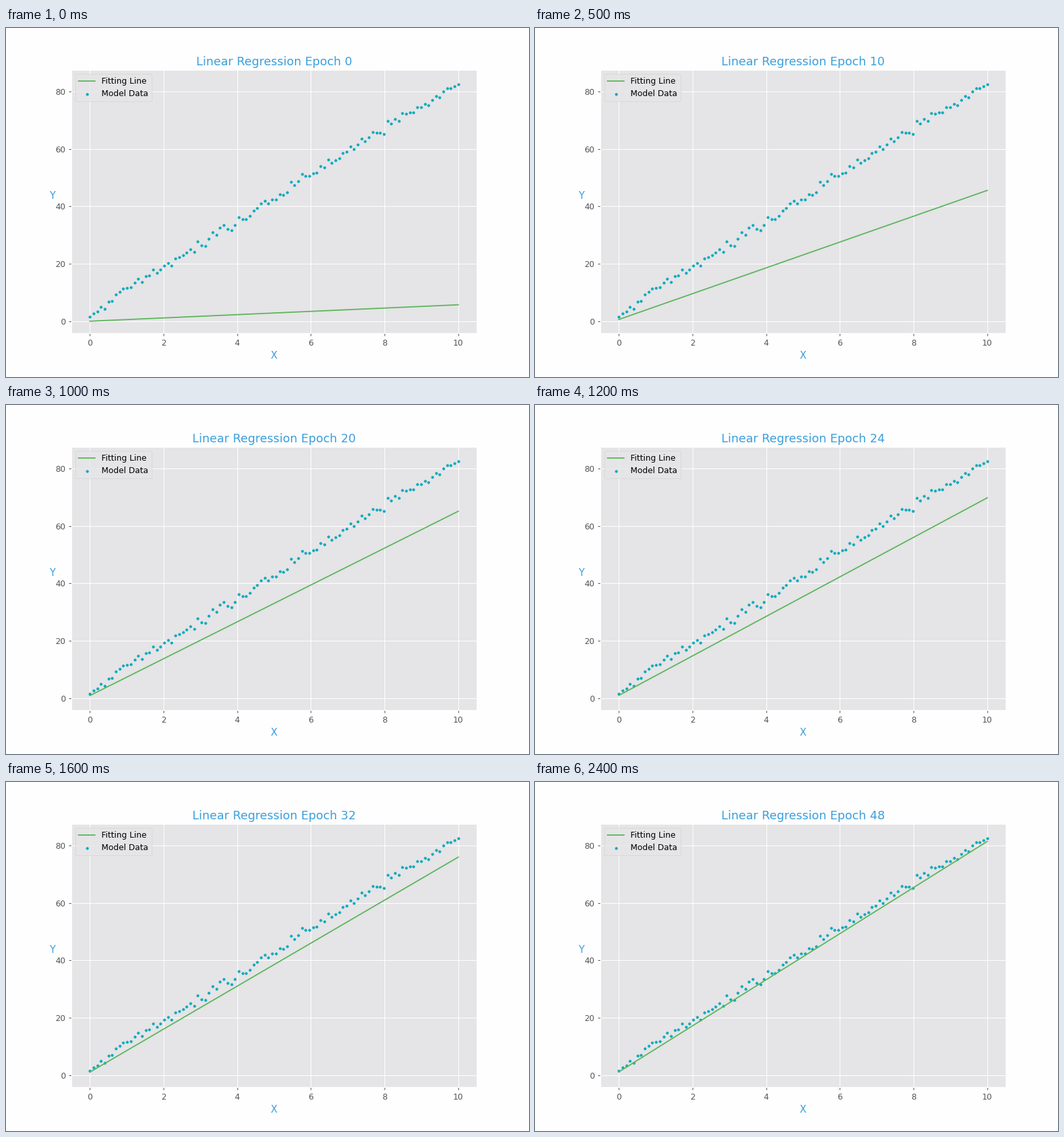
A matplotlib script for the animation above (2500 ms loop, 800 by 533 pixels).

```python
import numpy as np
import matplotlib.pyplot as plt
from matplotlib.animation import FuncAnimation

W, H, DPI = 800, 533, 72  # at 72 dpi one point is one pixel
FRAMES, INTERVAL, EPOCHS_PER_FRAME = 25, 100, 2
BLUE, TEAL, GREEN = "#3a9fdd", "#03a9bd", "#5cb65d"
PAPER, PANEL, GREY = "#fefefe", "#e5e4e6", "#555555"

plt.rcParams.update({"font.family": "DejaVu Sans", "font.size": 12.5})

# Noisy samples of y = 8x + 3
rng = np.random.default_rng(8)
x = np.linspace(0, 10, 100)
y = 8 * x + 3 + np.clip(rng.normal(0, 0.85, x.size), -2.2, 2.2)


def fit(epoch):
    """Line heights at x = 0 and x = 10, closing in geometrically."""
    gap = np.exp(-0.0711 * epoch)
    return [1.26 - 1.17 * gap, 83.93 - 78.13 * gap]


def axis_label(px, py, text):
    fig.text(px / W, 1 - py / H, text, color=BLUE, size=15,
             ha="center", va="baseline")


fig = plt.figure(figsize=(W / DPI, H / DPI), dpi=DPI, facecolor=PAPER)
ax = fig.add_axes([0.125, 0.125, 0.775, 0.755], facecolor=PANEL)
ax.set(xlim=(-0.5, 10.5), ylim=(-4.14, 87.45),
       xticks=range(0, 11, 2), yticks=range(0, 81, 20))
ax.set_axisbelow(True)
ax.grid(color="white", lw=1)
ax.tick_params(color=GREY, labelcolor=GREY, length=4.4, width=1, pad=4.4)
for spine in ax.spines.values():
    spine.set(color="white", linewidth=1.25)

line, = ax.plot([0, 10], fit(0), color=GREEN, lw=1.85, label="Fitting Line")
ax.scatter(x, y, s=13.5, color=TEAL, lw=0.5, zorder=1, label="Model Data")
legend = ax.legend(loc="upper left", facecolor=PANEL, edgecolor="0.8",
                   framealpha=0.8, labelspacing=0.47)
legend.get_frame().set_linewidth(0.6)

title = ax.set_title("", color=BLUE, size=18, pad=6.7)
axis_label(410, 505, "X")
axis_label(72, 261, "Y")


def update(frame):
    epoch = frame * EPOCHS_PER_FRAME
    line.set_ydata(fit(epoch))
    title.set_text(f"Linear Regression Epoch {epoch}")
    return line, title


anim = FuncAnimation(fig, update, frames=FRAMES, interval=INTERVAL,
                     repeat=True, repeat_delay=0, blit=False)
plt.show()
```
